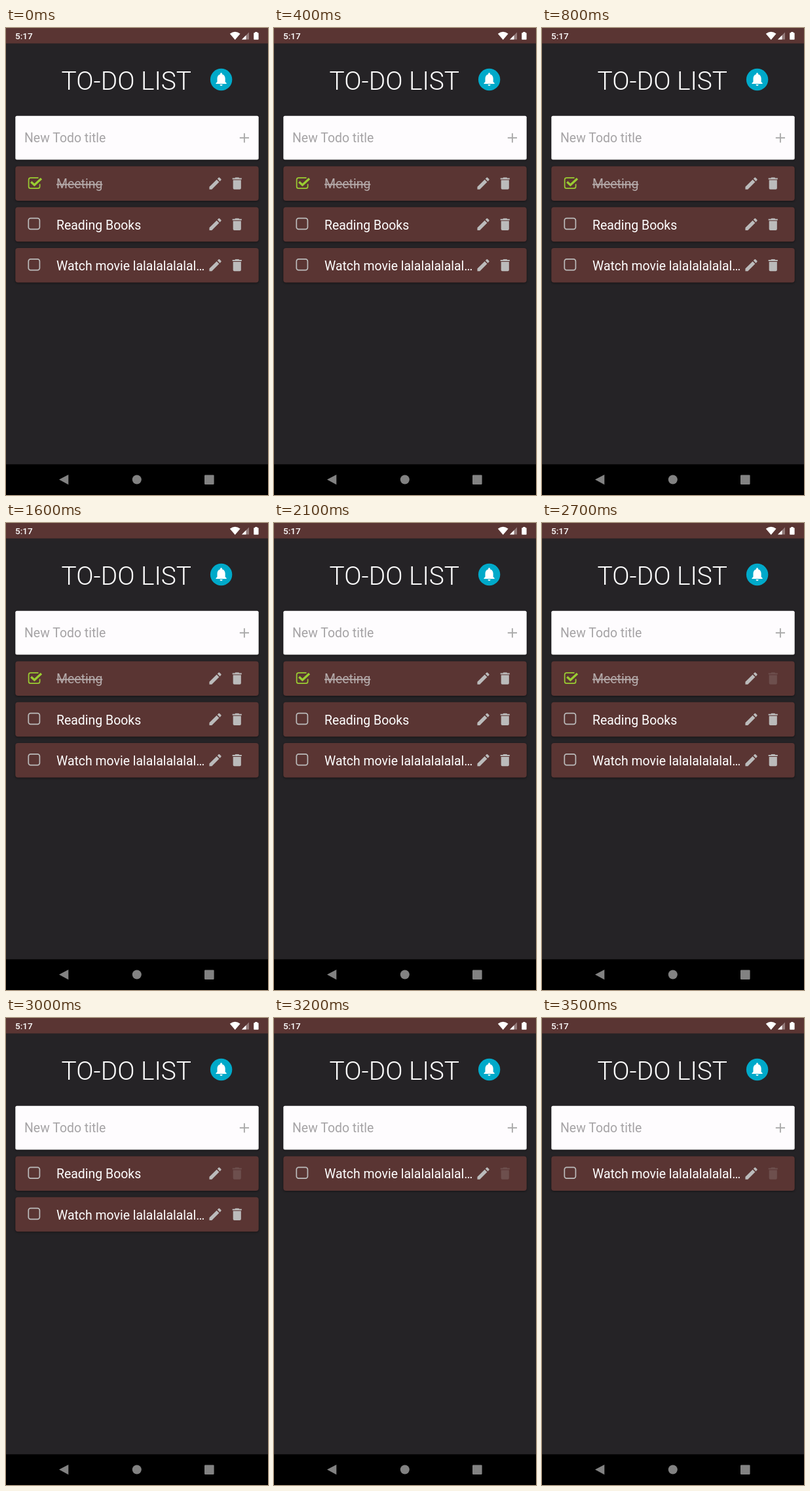
An HTML page for the animation above (4000 ms loop, 400 by 711 pixels).

```html
<!DOCTYPE html>
<html lang="en">
<head>
<meta charset="utf-8">
<title>To-do list</title>
<style>
  html, body { margin: 0; width: 100%; height: 100%; overflow: hidden; background: #252326; }
  svg { display: block; width: 400px; height: 711px; font: 19.45px Roboto, sans-serif; }
  .card { filter: drop-shadow(0 1px 1.5px rgba(0, 0, 0, .45)); }
  .box { fill: none; stroke: #bbb; stroke-width: 1.7; }
  .done { text-decoration: line-through; }
</style>
</head>
<body>
<svg viewBox="0 0 400 711">
  <defs>
    <path id="pencil" fill="#bbb" d="M3 17.25V21h3.75L17.81 9.94l-3.75-3.75L3 17.25zM20.71 7.04c.39-.39.39-1.02 0-1.41l-2.34-2.34c-.39-.39-1.02-.39-1.41 0l-1.83 1.83 3.75 3.75 1.83-1.83z"/>
    <path id="bin" fill="#bbb" d="M6 19c0 1.1.9 2 2 2h8c1.1 0 2-.9 2-2V7H6v12zM19 4h-3.5l-1-1h-5l-1 1H5v2h14V4z"/>
  </defs>
  <rect width="400" height="711" fill="#252326"/>

  <!-- Status bar -->
  <rect width="400" height="23.5" fill="#5a3533"/>
  <g fill="#fff">
    <text x="14" y="17" font-size="13.6" font-weight="500">5:17</text>
    <path d="M341.8 8.8Q349.7 2.8 357.6 8.8L349.7 18Z"/>
    <path d="M371 6.5V17.5H360Z" opacity=".35"/>
    <path d="M366.5 11V17.5H360Z"/>
    <path d="M380.2 6h3.4v1.3h1.3q.7 0 .7.7v9q0 .8-.8.8h-5.8q-.8 0-.8-.8v-9q0-.7.7-.7h1.3Z"/>
  </g>

  <!-- Header -->
  <text x="84.5" y="94" font-size="38.9" font-weight="300" fill="#fff">TO-DO LIST</text>
  <circle cx="328.6" cy="78.5" r="16.7" fill="#00a9c9"/>
  <path transform="translate(316.4 65.7) scale(1.014)" fill="#fff" d="M12 22c1.1 0 2-.9 2-2h-4c0 1.1.89 2 2 2zm6-6v-5c0-3.07-1.64-5.64-4.5-6.32V4c0-.83-.67-1.5-1.5-1.5s-1.5.67-1.5 1.5v.68C7.63 5.36 6 7.92 6 11v5l-2 2v1h16v-1l-2-2z"/>

  <!-- New item field -->
  <rect class="card" x="14.3" y="133.7" width="371.4" height="66.8" rx="2.5" fill="#fefcfe"/>
  <text x="28" y="174" fill="#a5a3a5">New Todo title</text>
  <path d="M356.8 167.3h14.2M363.9 160.2v14.2" stroke="#aaa" stroke-width="1.9"/>

  <g id="list"></g>

  <!-- Navigation bar -->
  <rect y="664.3" width="400" height="47" fill="#000"/>
  <g fill="#828282">
    <path d="M81 687.5L95.3 680V695.2Z"/>
    <circle cx="199.8" cy="687.5" r="7"/>
    <rect x="303" y="680.4" width="14.6" height="14.6" rx="1.2"/>
  </g>
</svg>
<script>
const LOOP = 4000, STEP = 100, PITCH = 62.25;
const items = [
  { title: "Meeting", done: true, removed: 2800 },
  { title: "Reading Books", removed: 3200 },
  { title: "Watch movie lalalalalalal…", removed: Infinity }
];
// Opacity of the pressed bin in the top row: [ms, value]
const press = [[0, 1], [2400, 1], [2600, .2], [2800, .2], [2900, .6], [3000, .2],
  [3200, .2], [3300, .6], [3400, .8], [3500, .2], [LOOP, .2]];

const checkbox = done => done
  ? `<path d="M49.5 228.2H37.6Q34.6 228.2 34.6 231.2V241.2Q34.6 244.2 37.6 244.2H48.6Q51.6 244.2 51.6 241.2V237.5"
       class="box" style="stroke:#9acd32"/>
     <path d="M38.2 234.2L43.4 239L54 229.2" fill="none" stroke="#9acd32" stroke-width="3.3"/>`
  : `<rect class="box" x="34.3" y="227.4" width="17.1" height="16.8" rx="3.3"/>`;

const row = ({ title, done }) => `<g>
  <rect class="card" x="14.3" y="210.5" width="371.4" height="52.4" rx="4" fill="#5a3533"/>
  ${checkbox(done)}
  <text x="77" y="244.3" fill="${done ? "#b5abab" : "#fff"}" class="${done ? "done" : ""}">${title}</text>
  <use href="#pencil" transform="translate(307.4 224.4) scale(1.013)"/>
  <use href="#bin" class="bin" transform="translate(340.6 224.4) scale(1.013)"/>
</g>`;

const list = document.getElementById("list");
list.innerHTML = items.map(row).join("");
const rows = [...list.children];

function sample(keys, t) {
  const i = keys.findIndex(k => k[0] > t);
  const [t0, a] = keys[i - 1], [t1, b] = keys[i];
  return a + (b - a) * (t - t0) / (t1 - t0);
}

function draw() {
  const t = Math.floor(performance.now() % LOOP / STEP) * STEP;
  let slot = 0;
  rows.forEach((el, i) => {
    const shown = t < items[i].removed;
    el.style.display = shown ? "" : "none";
    if (!shown) return;
    el.setAttribute("transform", `translate(0 ${slot * PITCH})`);
    el.querySelector(".bin").setAttribute("opacity", slot ? 1 : sample(press, t));
    slot++;
  });
  requestAnimationFrame(draw);
}
draw();
</script>
</body>
</html>
```
